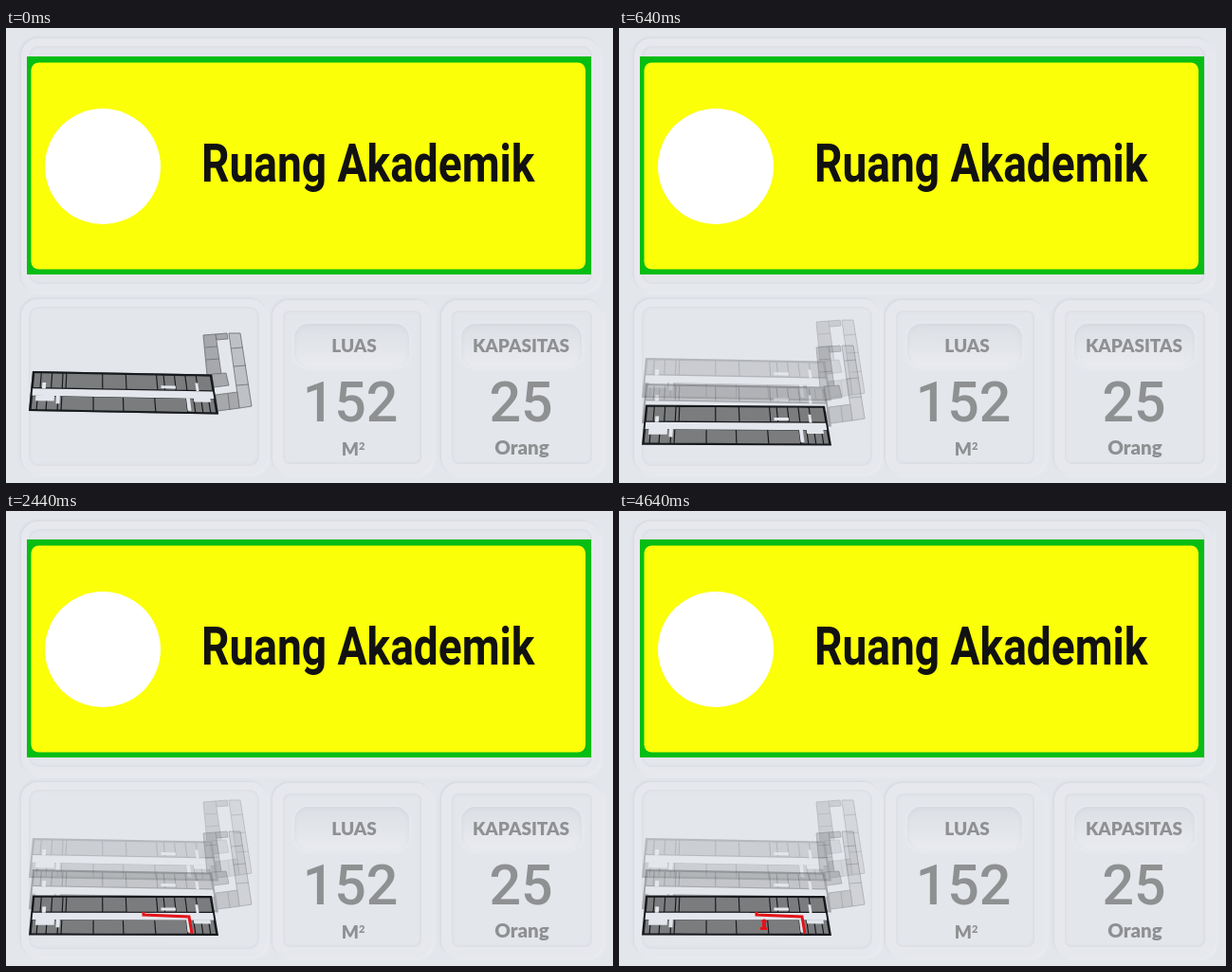
Recreate the animation shown at these times as an HTML page. Size 640 px wide and 480 px high, loop 5.12 s.

```html
<!DOCTYPE html>
<html lang="id">
<head>
<meta charset="utf-8">
<title>Ruang Akademik</title>
<style>
  html, body { margin: 0; width: 100%; height: 100%; overflow: hidden; background: #e3e6eb; }
  .panel, .pill, svg { position: absolute; box-sizing: border-box; }
  .panel {
    border: 8px solid #e6e8ed; border-radius: 18px;
    box-shadow: -1px -1px 3px #d3d6dc, 2px 2px 4px #eceef2,
      inset 1px 1px 3px #dadde3, inset -1px -1px 3px #d8dbe1;
  }
  .raised { border-width: 11px; top: 287px; height: 184px; }
  .pill {
    top: 312px; height: 46px; border-radius: 15px;
    background: linear-gradient(#dcdfe4, #e9ebef);
    box-shadow: 0 1px 5px #eceef2, inset 0 2px 4px #d6d9df;
  }
  svg { left: 0; top: 0; }
  .label { font: 900 19px Lato, sans-serif; }
  .value { font: 500 59px Roboto, sans-serif; }
  .info { fill: #8f9092; text-anchor: middle; }
</style>
</head>
<body>
<div class="panel" style="left:16px;top:11px;width:610px;height:267px"></div>
<div class="panel" style="left:16px;top:286px;width:259px;height:184px"></div>
<div class="panel raised" style="left:281px;width:168px"></div>
<div class="panel raised" style="left:459px;width:170px"></div>
<div class="pill" style="left:304px;width:121px"></div>
<div class="pill" style="left:480px;width:127px"></div>

<svg width="640" height="480" viewBox="0 0 640 480">
  <rect x="22" y="30" width="595" height="230" fill="#06bd14"/>
  <rect x="26.5" y="36.5" width="584.5" height="218" rx="8" fill="#fbff08"/>
  <circle cx="102" cy="146" r="61" fill="#fff"/>
  <text transform="translate(206 161.5) scale(.823 1)" fill="#111" font-family="Roboto, sans-serif" font-weight="700" font-size="56">Ruang Akademik</text>

  <g class="info">
    <text class="label" x="367" y="342">LUAS</text>
    <text class="label" x="543" y="342">KAPASITAS</text>
    <text class="value" x="363" y="415">152</text>
    <text class="value" x="543" y="415">25</text>
    <text class="label" x="366" y="451">M<tspan font-size="11" dy="-6">2</tspan></text>
    <text class="label" x="544" y="450" style="font-size:20.5px">Orang</text>
  </g>

  <g id="top"></g>
  <g id="middle"></g>
  <g id="ground"></g>
  <path id="route" d="M145 423V426L193 428L196 446" fill="none" stroke="#e31418" stroke-width="3"/>
  <g id="pin" fill="#e31418">
    <circle cx="153" cy="433" r="2.5"/>
    <path d="M151 435h4v4h1v3h-7v-3h2z"/>
  </g>
</svg>

<script>
const LOOP = 5120;
const DARK = '#17191d', ROOM = '#7b7c7e', PALE = '#e3e6ec';
const $ = id => document.getElementById(id);
const clamp = x => Math.min(1, Math.max(0, x));
const mix = (a, b, k) => a + (b - a) * k;

// Maps plan percentages onto the tilted floor slab.
function project(u, v) {
  u /= 100; v /= 100;
  return [mix(mix(28, 217, u), mix(24, 224, u), v),
          mix(mix(362, 365.5, u), mix(404, 407.5, u), v)];
}
const poly = (points, fill, extra = '') => `<polygon points="${points.join(' ')}" fill="${fill}" ${extra}/>`;
const cell = (u0, v0, u1, v1, fill) =>
  poly([project(u0, v0), project(u1, v0), project(u1, v1), project(u0, v1)], fill);
const rooms = (walls, v0, v1) =>
  walls.slice(1).map((u, i) => cell(walls[i] + .3, v0, u - .3, v1, ROOM)).join('');

const mainBlock =
  cell(0, 0, 100, 100, DARK) +
  cell(1, 43, 99, 61, PALE) +
  rooms([1, 5, 11, 17, 19, 39, 52, 69, 73, 79, 85, 91, 99], 5, 40) +
  rooms([1, 4, 9, 15, 17, 34, 50, 67, 84, 88, 92, 96, 99], 62, 95) +
  cell(3, 60, 13, 74, PALE) + cell(6, 28, 8, 43, PALE) +
  cell(14, 60, 16, 80, PALE) + cell(71, 30, 79, 37, PALE) +
  cell(84, 60, 86, 92, PALE) + cell(88, 60, 97, 70, PALE) +
  cell(90, 22, 91.5, 43, PALE);

const wingEdge = `stroke="${DARK}" stroke-width=".8"`;
const wing =
  poly([[208, 324], [247, 322], [259, 399], [223, 404]], PALE) +
  poly([[208, 324], [221, 323], [227, 365], [212, 366]], ROOM, wingEdge) +
  poly([[217, 365], [232, 364], [235, 377], [219, 379]], ROOM, wingEdge) +
  poly([[221, 323], [233, 322], [234, 328], [222, 329]], ROOM, wingEdge) +
  poly([[235, 322], [247, 322], [259, 399], [246, 401]], '#a5a7ab', wingEdge) +
  poly([[221, 387], [244, 384], [246, 401], [223, 404]], ROOM, wingEdge) +
  `<path d="M210 337l13-1M211 350l14-1M237 338l13-1M240 357l13-1M243 377l13-1M234 386l2 17" ${wingEdge}/>`;

$('top').innerHTML = $('middle').innerHTML = wing + mainBlock;
$('ground').innerHTML = mainBlock;

function draw(now) {
  const t = now % LOOP;
  const spread = 1 - (1 - clamp(t / 1120)) ** 2;
  const fade = (id, opacity) => $(id).setAttribute('opacity', opacity);
  const shift = (id, dy, skew = 0) =>
    $(id).setAttribute('transform', `translate(0 ${dy * spread}) skewY(${skew * spread})`);
  shift('top', -17);
  shift('middle', 16);
  shift('ground', 44, -.9);
  fade('top', mix(.3, .22, spread));
  fade('middle', mix(.4, .3, spread));
  fade('route', clamp((t - 1560) / 440));
  fade('pin', clamp((t - 2920) / 240));
  requestAnimationFrame(draw);
}
requestAnimationFrame(draw);
</script>
</body>
</html>
```
